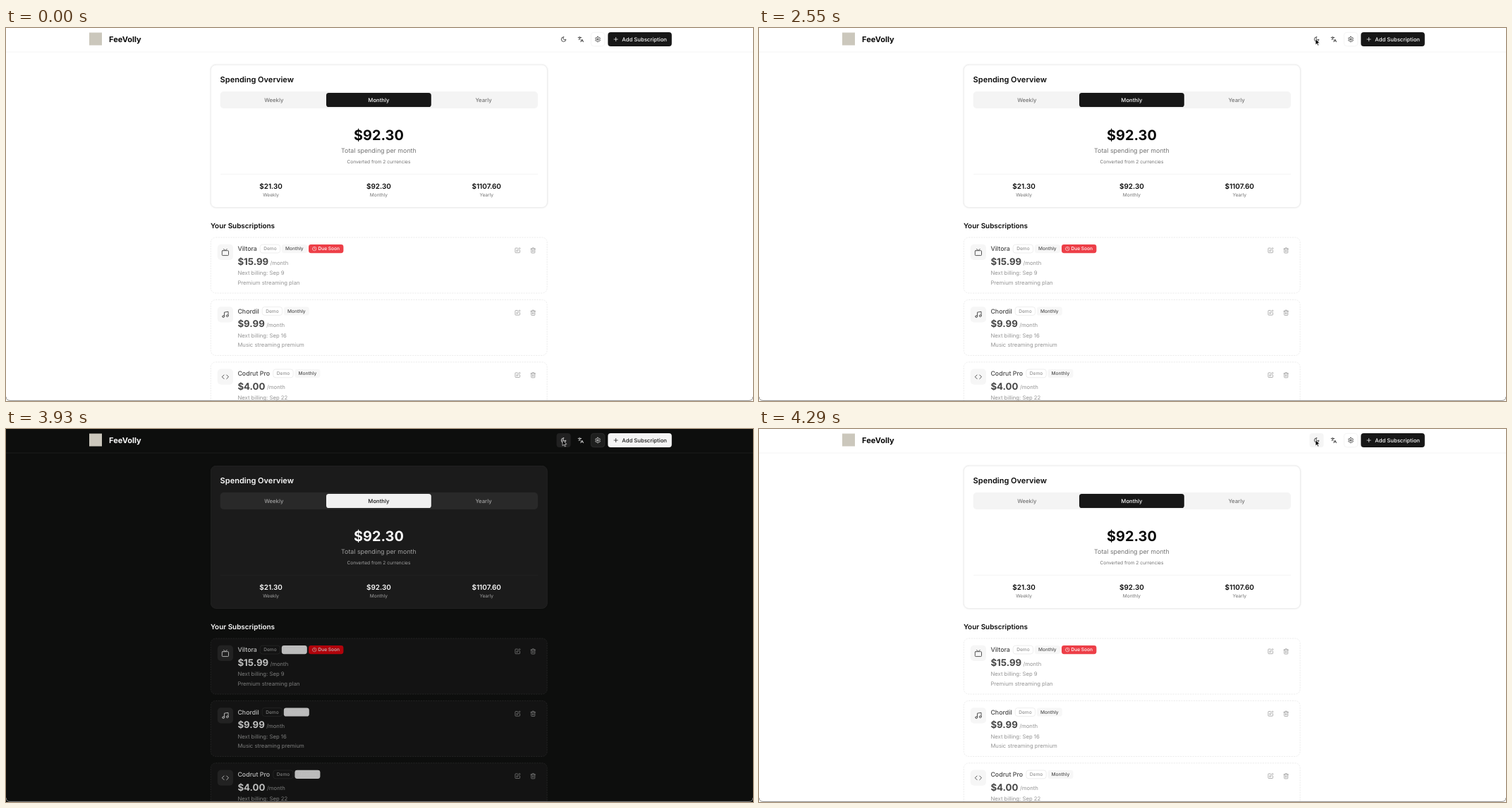
Write an HTML page that moves like this. It is 1059 px wide and 529 px high and loops after 4920 ms.

```html
<!DOCTYPE html>
<html lang="en">
<head>
<meta charset="utf-8">
<title>Subscription overview</title>
<style>
:root {
  /* --p: page fade, --q: quicker control fade, --j: instant switch */
  --p: 0%; --q: 0%; --j: 0%;
  --page: color-mix(in oklab, #fff, #0d0e0d var(--p));
  --card: color-mix(in oklab, #fff, #1b1b1b var(--p));
  --row: color-mix(in oklab, #fff, #151515 var(--p));
  --ink: color-mix(in oklab, #0a0a0a, #fafafa var(--p));
  --muted: color-mix(in oklab, #737373, #a1a1a1 var(--p));
  --soft: color-mix(in oklab, #f4f4f4, #292929 var(--p));
  --line: color-mix(in oklab, #e8e8e8, #2a2a2a var(--p));
  --tag-line: color-mix(in oklab, #dadada, #383838 var(--p));
  --main: color-mix(in oklab, #171717, #f2f2f2 var(--p));
  --on-main: color-mix(in oklab, #fafafa, #171717 var(--p));
  --btn: color-mix(in oklab, #171717, #f4f4f4 var(--q));
  --on-btn: color-mix(in oklab, #fafafa, #171717 var(--q));
  --icon: color-mix(in oklab, #171717, #fafafa var(--q));
  --tool: color-mix(in oklab, #737373, #a8a8a8 var(--q));
  --gear: color-mix(in oklab, #fff, #30303080 var(--q));
  --gear-line: color-mix(in oklab, #ececec, #363636 var(--q));
  --hover: color-mix(in oklab, #f5f5f5, #2e2e2e99 var(--q));
  --badge: color-mix(in oklab, #f5f5f5, #262626 var(--j));
  --badge-ink: color-mix(in oklab, #171717, #fafafa var(--q));
  --dash: color-mix(in oklab, #e6e6e6, #2b2b2b var(--q));
  --alert: color-mix(in oklab, #e7000b, #82181a var(--j));
}
html, body { margin: 0; width: 100%; height: 100%; overflow: hidden; background: var(--page); }
svg { display: block; width: 100vw; height: 100vh; }
text { font-family: Inter, sans-serif; font-optical-sizing: none; text-rendering: geometricPrecision; white-space: pre; }
</style>
</head>
<body>
<svg id="stage" viewBox="0 0 1059 529"></svg>
<script>
const XS = 6.62, SM = 7.73, MD = 8.83, LG = 9.94, XL = 11.04;

const text = (s, x, y, size, color = 'ink', weight = 400, anchor = 'start') =>
  `<text x="${x}" y="${y}" font-size="${size}" font-weight="${weight}" text-anchor="${anchor}" fill="var(--${color})">${s}</text>`;
const mid = (s, x, y, size, color, weight) => text(s, x, y, size, color, weight, 'middle');
const box = (x, y, w, h, r, fill, extra = '') =>
  `<rect x="${x}" y="${y}" width="${w}" height="${h}" rx="${r}" fill="${fill && `var(--${fill})` || 'none'}" ${extra}/>`;
const edge = (color, width = .6) => `stroke="var(--${color})" stroke-width="${width}"`;
const ring = (x, y, r) => `M${x - r} ${y}a${r} ${r} 0 1 0 ${2 * r} 0a${r} ${r} 0 1 0 ${-2 * r} 0`;

// Six-toothed cog on a 24-unit grid
const cog = 'M' + Array.from({ length: 72 }, (_, i) => {
  const a = i / 72 * 2 * Math.PI, r = 8.7 + 1.5 * Math.tanh(2 * Math.cos(6 * a));
  return `${(12 + r * Math.sin(a)).toFixed(2)} ${(12 - r * Math.cos(a)).toFixed(2)}`;
}).join('L') + 'Z';

const icons = {
  moon: 'M12 3a6 6 0 0 0 9 9 9 9 0 1 1-9-9Z',
  sun: ring(12, 12, 4) + 'M12 2v2M12 20v2M4.9 4.9l1.4 1.4M17.7 17.7l1.4 1.4M2 12h2M20 12h2M6.3 17.7l-1.4 1.4M19.1 4.9l-1.4 1.4',
  lang: 'M5 8l6 6M4 14l6-6 2-3M2 5h12M7 2h1M22 22l-5-10-5 10M14 18h6',
  gear: cog + ring(12, 12, 3),
  plus: 'M5 12h14M12 5v14',
  tv: 'M4 7h16a2 2 0 0 1 2 2v11a2 2 0 0 1-2 2H4a2 2 0 0 1-2-2V9a2 2 0 0 1 2-2ZM17 2l-5 5-5-5',
  music: 'M9 18V5l12-2v13' + ring(6, 18, 3) + ring(18, 16, 3),
  code: 'M16 18l6-6-6-6M8 6l-6 6 6 6',
  clock: ring(12, 12, 10) + 'M12 6v6l4 2',
  edit: 'M12 3H5a2 2 0 0 0-2 2v14a2 2 0 0 0 2 2h14a2 2 0 0 0 2-2v-7M18.4 2.6a1 1 0 0 1 3 3l-9 9-4 1 1-4Z',
  bin: 'M3 6h18M19 6v14a2 2 0 0 1-2 2H7a2 2 0 0 1-2-2V6M8 6V4a2 2 0 0 1 2-2h4a2 2 0 0 1 2 2v2M10 11v6M14 11v6'
};
const icon = (name, x, y, size, color, id = '') =>
  `<path ${id && `id="${id}"`} d="${icons[name]}" transform="translate(${x - size / 2} ${y - size / 2}) scale(${size / 24})"
    fill="none" stroke="var(--${color})" stroke-width="2" stroke-linecap="round" stroke-linejoin="round"/>`;

const header = () =>
  `<path d="M0 34H1059" ${edge('line', .5)}/>
  <rect x="118" y="6.5" width="18" height="18" fill="#cbc7bc"/>` +
  text('FeeVolly', 146, 19.9, XL, 'ink', 700) +
  box(780.5, 6, 20, 20, 4, 'hover', 'id="hover"') +
  box(829.3, 6.3, 19.4, 19.4, 4, 'gear', edge('gear-line')) +
  icon('moon', 790.5, 16, MD, 'icon', 'moon') + icon('sun', 790.5, 16, MD, 'icon', 'sun') +
  icon('lang', 814.8, 16, MD, 'icon') + icon('gear', 839, 16, MD, 'icon') +
  box(853.3, 6, 90.5, 20, 4, 'btn') + icon('plus', 864.6, 16, MD, 'on-btn') +
  text('Add Subscription', 873.3, 18.8, SM, 'on-btn', 500);

const overview = () =>
  box(290.3, 52.3, 477, 202.2, 7.5, 'card', edge('line') + ' style="filter:drop-shadow(0 .8px .8px #0002)"') +
  text('Spending Overview', 303.6, 77, XL, 'ink', 600) +
  box(303.6, 90, 450.4, 24, 5, 'soft') + box(454, 92, 148.8, 20, 3.6, 'main') +
  ['Weekly', 'Monthly', 'Yearly'].map((s, i) =>
    mid(s, 379.8 + 148.6 * i, 104.8, SM, i === 1 ? 'on-main' : 'muted', 500) +
    mid(['$21.30', '$92.30', '$1107.60'][i], 375.6 + 152.8 * i, 227.9, LG, 'ink', 600) +
    mid(s, 375.6 + 152.8 * i, 238.8, XS, 'muted')).join('') +
  mid('$92.30', 528.4, 159.2, 19.87, 'ink', 700) +
  mid('Total spending per month', 528.4, 177, MD, 'muted') +
  mid('Converted from 2 currencies', 528.4, 191.5, XS, 'muted') +
  `<path d="M304 207.3H754" ${edge('line', .5)}/>`;

const row = ([name, glyph, price, date, note, tagX, perX, due], i) =>
  `<g transform="translate(0 ${88.4 * i})" opacity=".75">` +
  box(290.3, 297, 476.8, 79, 7, 'row', edge('dash', 1) + ' stroke-dasharray="2.2 1.3"') +
  box(299.8, 306.8, 22.2, 22.2, 5, 'soft') + icon(glyph, 310.9, 318, XL, 'ink') +
  text(name, 328.4, 316.3, MD, 'ink', 500) +
  box(tagX, 307.2, 28.4, 11.8, 3.4, '', edge('tag-line')) +
  mid('Demo', tagX + 14.2, 315.4, XS, 'muted', 500) +
  box(tagX + 30.6, 307, 36, 12.2, 3.4, 'badge') +
  mid('Monthly', tagX + 48.6, 315.4, XS, 'badge-ink', 500) +
  (due ? box(429, 307, 49.4, 12.2, 3.4, 'alert') +
    `<g style="--w:#fff">${icon('clock', 437.2, 313.1, XS, 'w')}${text('Due Soon', 442.4, 315.4, XS, 'w', 500)}</g>` : '') +
  text(price, 328.4, 335.8, 13.25, 'ink', 700) +
  text('/month', perX, 335.6, SM, 'muted') +
  text('Next billing: ' + date, 328.4, 350.4, SM, 'muted') +
  text(note, 328.4, 363.7, SM, 'muted') +
  icon('edit', 725.2, 315.4, MD, 'tool') + icon('bin', 747.2, 315.4, MD, 'tool') + '</g>';

const rows = [
  ['Viltora', 'tv', '$15.99', 'Sep 9', 'Premium streaming plan', 360.2, 374.4, true],
  ['Chordil', 'music', '$9.99', 'Sep 16', 'Music streaming premium', 363.2, 369.2],
  ['Codrut Pro', 'code', '$4.00', 'Sep 22', 'Developer tools plan', 378.8, 370]
];

const $ = id => document.getElementById(id);
$('stage').innerHTML = box(0, 0, 1059, 529, 0, 'page') + header() + overview() +
  text('Your Subscriptions', 290, 283.7, LG, 'ink', 600) + rows.map(row).join('') +
  `<path d="M0 523Q.5 528.4 6 528.4H1053Q1058.5 528.4 1059 523" fill="none" stroke="#8c8c8c"/>
  <path id="cursor" d="M0 0V8.2L1.9 6.5L3.2 9.4L4.5 8.8L3.2 6H5.8Z" fill="#000" stroke="#fff" stroke-width=".6"/>`;

const LOOP = 4920, FADE = 150;
const clamp = v => Math.min(1, Math.max(0, v));
const smooth = v => v * v * (3 - 2 * v);

// cubic-bezier(.4, 0, .2, 1)
function ease(x) {
  if (x <= 0 || x >= 1) return clamp(x);
  let lo = 0, hi = 1;
  for (let i = 0; i < 20; i++) {
    const u = (lo + hi) / 2, v = 1 - u;
    if (1.2 * v * v * u + .6 * v * u * u + u ** 3 < x) lo = u; else hi = u;
  }
  return 3 * lo * lo - 2 * lo ** 3;
}

function draw(now) {
  const t = now % LOOP;
  const toDark = ease((t - 2822) / FADE), toLight = ease((t - 3940) / FADE);
  const dark = t >= 2820 && t < 3930;
  const set = (name, v) => document.documentElement.style.setProperty(name, v * 100 + '%');
  set('--p', toDark - toLight);
  set('--q', clamp(toDark * 1.83) - clamp(toLight * 1.83));
  set('--j', +dark);

  const show = (id, on) => $(id).style.visibility = on ? 'visible' : 'hidden';
  show('moon', !dark);
  show('sun', dark);
  show('hover', t >= 2580);
  show('cursor', t >= 1140);

  const a = smooth(clamp((t - 1120) / 550)), b = smooth(clamp((t - 1680) / 330));
  $('cursor').setAttribute('transform', `translate(${987 - 193 * a - 5 * b} ${77 - 59.5 * a - 2 * b})`);
}

const start = performance.now();
(function tick() {
  draw(performance.now() - start);
  requestAnimationFrame(tick);
})();
</script>
</body>
</html>
```
